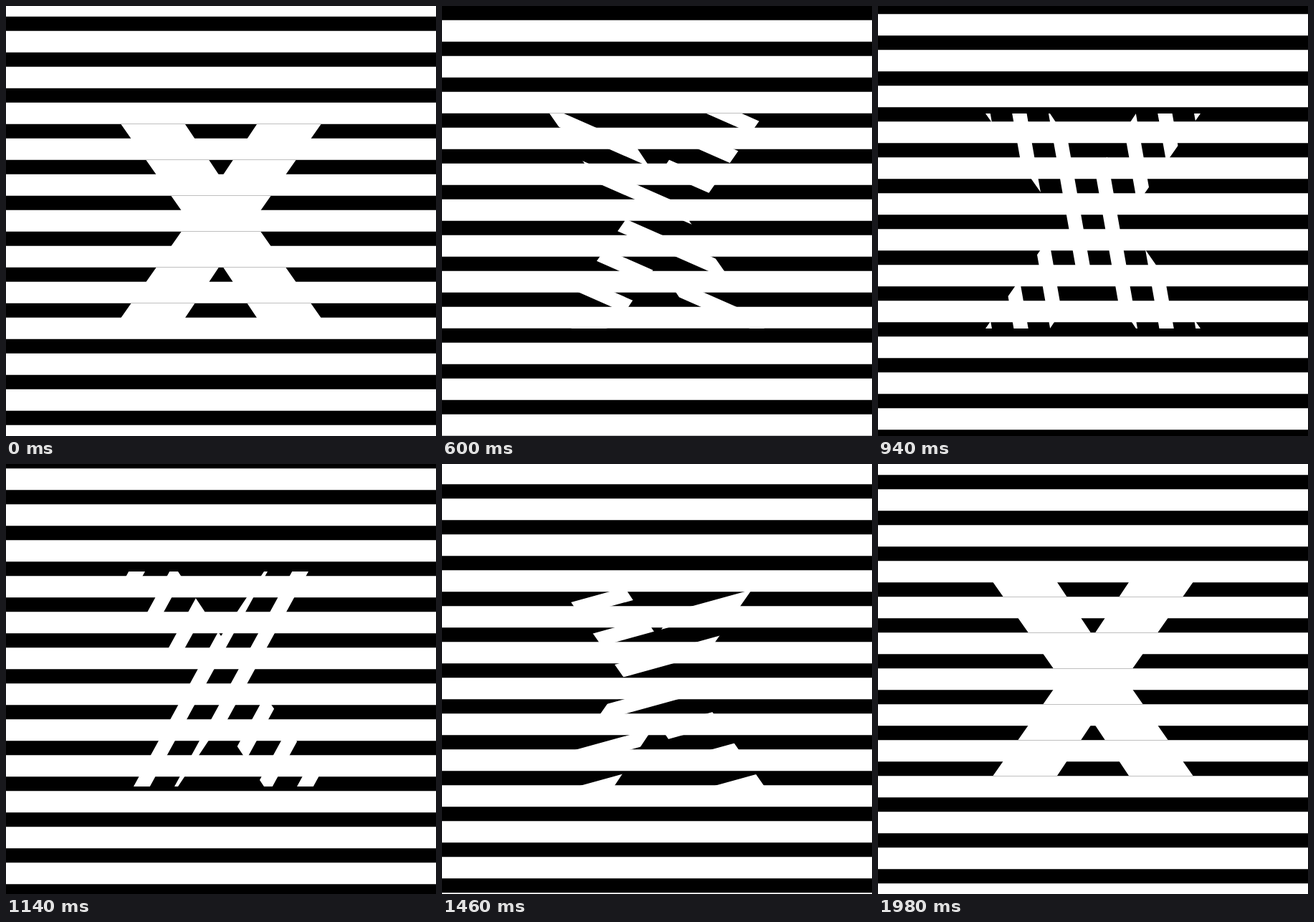
An HTML page that plays this animation: 600 by 600 pixels, repeating every 2 s.

```html
<!DOCTYPE html>
<html lang="en">
<head>
<meta charset="utf-8">
<title>Striped X</title>
<style>
  html, body { margin: 0; width: 100%; height: 100%; overflow: hidden; background: #fff; }
  svg { display: block; width: 600px; height: 600px; }
</style>
</head>
<body>
<svg viewBox="0 0 600 600">
  <defs>
    <clipPath id="cross">
      <path d="M150 150H240L300 240L360 150H450L345 300L450 450H360L300 360L240 450H150L255 300Z"/>
    </clipPath>
  </defs>
  <path id="rows" fill="#000"/>
  <g clip-path="url(#cross)">
    <path id="bars" fill="#fff"/>
  </g>
</svg>
<script>
  const LOOP = 2000, PERIOD = 50, THICK = 20, LEAD = 8;
  const rows = document.getElementById('rows');
  const bars = document.getElementById('bars');

  const stripes = (x, y, width, count) =>
    Array.from({ length: count }, (_, i) =>
      `M${x} ${y + i * PERIOD}h${width}v${THICK}h${-width}z`).join('');

  rows.setAttribute('d', stripes(0, 15, 600, 13));
  bars.setAttribute('d', stripes(-300, -285, 600, 12));

  // Seventh-order smoothstep
  const ease = x => x ** 4 * (35 - 84 * x + 70 * x * x - 20 * x ** 3);

  const start = performance.now();

  function draw() {
    const t = (performance.now() - start + LEAD) % LOOP / LOOP;
    rows.setAttribute('transform', `translate(0 ${-PERIOD * t})`);
    bars.setAttribute('transform', `translate(300 300) rotate(${180 * ease(t)})`);
    requestAnimationFrame(draw);
  }
  draw();
</script>
</body>
</html>
```
